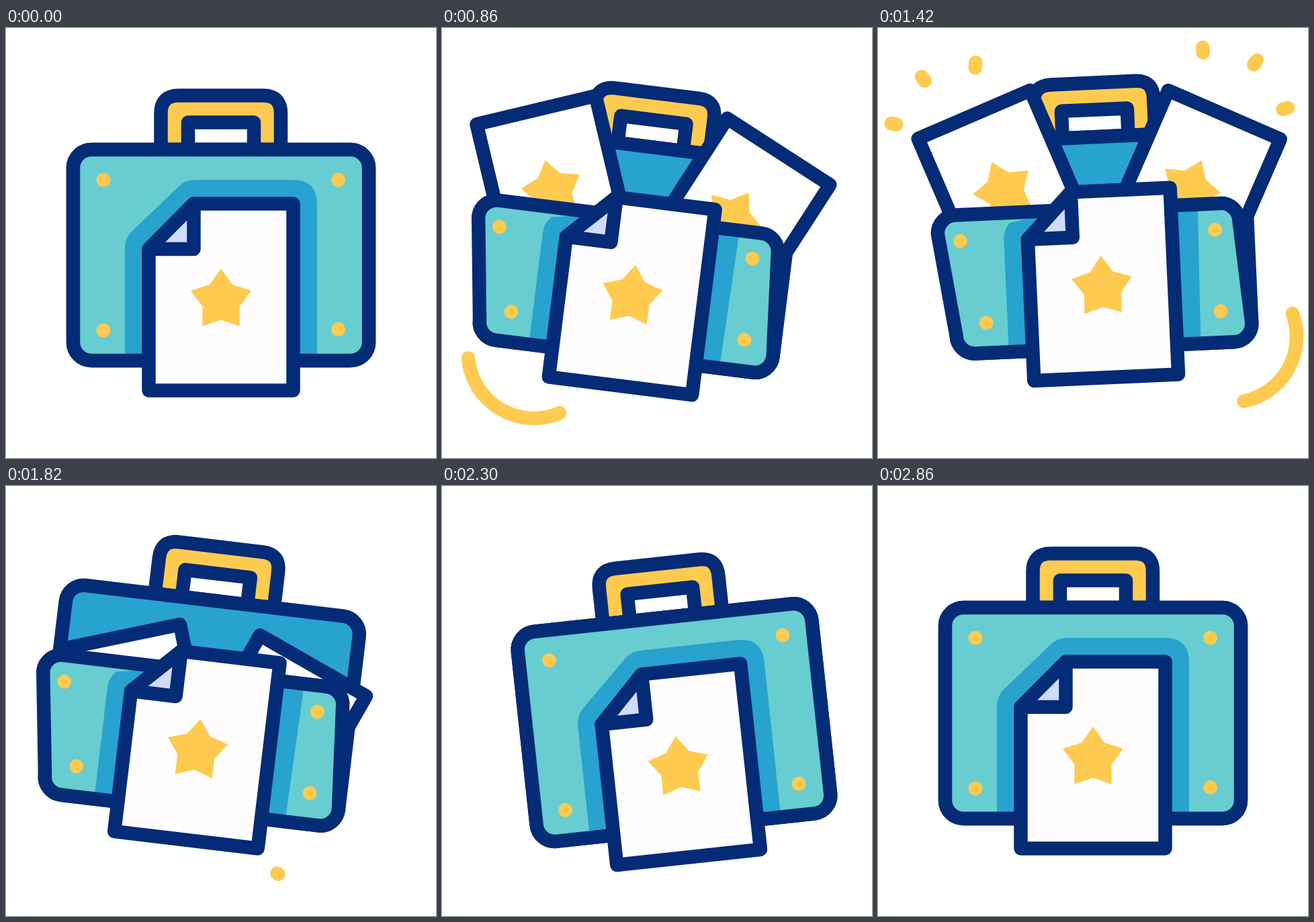
Animation of 640 by 640 pixels, one loop 3.56 s. Source, as an HTML page with a canvas:

```html
<!DOCTYPE html>
<html lang="en">
<head>
<meta charset="utf-8">
<title>Briefcase</title>
<style>
  html, body { margin: 0; width: 100%; height: 100%; overflow: hidden; background: #fff; }
  canvas { display: block; width: 100vmin; height: 100vmin; }
</style>
</head>
<body>
<canvas id="stage" width="640" height="640"></canvas>
<script>
const ctx = document.getElementById('stage').getContext('2d');
const LOOP = 3560, RAD = Math.PI / 180;
const NAVY = '#042b76', TEAL = '#67cdd0', BLUE = '#28a2ce', YELLOW = '#fecb50', FOLD = '#d1dbfa';

// Keys are [time, value] pairs, joined by a sine ease.
const ANGLE = [[220, 0], [350, -1], [790, 8], [1225, -5.6], [1820, 6.8], [2320, -6.2], [2860, 0]];
const LIFT = [[220, 0], [340, 20], [585, -30.5], [1110, 19.7], [1500, -23], [2300, 15.5], [2800, 0]];
const OPEN = [[370, 0], [655, 1], [1890, 1], [2190, 0]];
const PAPERS = [[610, 0], [900, 1], [1600, 1], [1990, 0]];

// Sparks: middle of the first dash and its heading in degrees.
const SPARKS = [[56, 157, 194], [88, 113, 236], [142, 102, 277], [488, 95, 266], [541, 110, 307], [569, 159, 348]];

const clamp = x => Math.min(1, Math.max(0, x));
const ramp = (t, from, to) => clamp((t - from) / (to - from));
const easeOut = p => 1 - (1 - p) ** 2;
const sine = p => (1 - Math.cos(Math.PI * p)) / 2;
const mix = (a, b, p) => a + (b - a) * p;

function track(keys, t) {
  let value = keys[0][1];
  for (let i = 1; i < keys.length; i++) {
    const [t0, v0] = keys[i - 1], [t1, v1] = keys[i];
    if (t >= t0) value = mix(v0, v1, sine(ramp(t, t0, t1)));
  }
  return value;
}

function shape(path, fill, line = NAVY) {
  if (typeof path === 'string') path = new Path2D(path);
  if (fill) { ctx.fillStyle = fill; ctx.fill(path); }
  if (line) { ctx.strokeStyle = line; ctx.stroke(path); }
}

// Case outline; opening carries the two upper corners down and to the left.
function panel(open) {
  const left = 100 - 21 * open, right = 540 - 12 * open, top = 181 + 107 * open;
  return new Path2D(`M${left} ${top + 27}a27 27 0 0 1 27 -27H${right - 27}a27 27 0 0 1 27 27` +
    'L540 468a27 27 0 0 1 -27 27H127a27 27 0 0 1 -27 -27Z');
}

function dot(x, y) {
  ctx.fillStyle = YELLOW;
  ctx.beginPath();
  ctx.arc(x, y, 10.5, 0, 7);
  ctx.fill();
}

function star(x, y) {
  ctx.fillStyle = YELLOW;
  ctx.beginPath();
  for (let i = 0; i < 10; i++) {
    const r = i % 2 ? 29 : 47.3, a = (i * 36 - 90) * RAD;
    ctx.lineTo(x + r * Math.cos(a), y + r * Math.sin(a));
  }
  ctx.fill();
}

function paper(x, y, angle) {
  ctx.save();
  ctx.translate(x, y);
  ctx.rotate(angle * RAD);
  shape('M-87 -123H95V95H-87Z', '#fff');
  star(0, 0);
  ctx.restore();
}

function swoosh(t, start, end, x, y, from, to) {
  const p = ramp(t, start, end);
  if (p <= 0 || p >= 1) return;
  const head = easeOut(ramp(p, 0, .485)), tail = ramp(p, .23, 1);
  ctx.strokeStyle = YELLOW;
  ctx.beginPath();
  ctx.arc(x, y, 98, mix(from, to, tail) * RAD, mix(from, to, head) * RAD, from > to);
  ctx.stroke();
}

function spark([x, y, heading], t) {
  const head = 58 * easeOut(ramp(t, 1006, 1542)) - 15;
  const tail = 58 * easeOut(ramp(t, 1076, 1685)) - 15;
  if (head <= -15 || tail >= 43) return;
  const c = Math.cos(heading * RAD), s = Math.sin(heading * RAD);
  ctx.strokeStyle = YELLOW;
  ctx.beginPath();
  ctx.moveTo(x + tail * c, y + tail * s);
  ctx.lineTo(x + head * c, y + head * s);
  ctx.stroke();
}

function flap(open) {
  const outline = panel(open), edge = 463 + 5 * open;
  shape(outline, TEAL, null);
  ctx.save();
  ctx.clip(outline);
  shape(`M177 495V328Q177 313 187 303L257 ${236 + 54 * open}Q267 226 281 226H427Q${edge} 226 ${edge} 262L463 495Z`, BLUE, null);
  ctx.restore();
  shape(outline);
  dot(145 - 33 * open, 226 + 101 * open);
  dot(494.5 - 3 * open, 226 + 101 * open);
  dot(145, 450);
  dot(494.5, 448.5);
}

function draw(t) {
  const open = track(OPEN, t), hidden = 1 - track(PAPERS, t);
  ctx.clearRect(0, 0, 640, 640);
  ctx.save();
  ctx.translate(320, 100 + track(LIFT, t));
  ctx.rotate(track(ANGLE, t) * RAD);
  ctx.translate(-320, -100);
  ctx.lineWidth = 20.5;
  ctx.lineCap = ctx.lineJoin = 'round';

  shape('M230.5 181V127Q230.5 100.5 257 100.5H383Q409 100.5 409 127V181Z', YELLOW);
  shape('M271 181V140.5H369V181Z', '#fff');
  shape(panel(0), BLUE);

  ctx.save();
  ctx.beginPath();
  ctx.rect(-200, -200, 1040, 680);
  ctx.clip();
  paper(181 + 68 * hidden, 256 + 187 * hidden, -20.7 + 3.6 * hidden);
  paper(455.5 - 50 * hidden, 265.5 + 175 * hidden, 26 - 5 * hidden);
  ctx.restore();

  flap(open);
  shape('M212.5 329L279.5 261.5H427.5V539.5H212.5Z', '#fffdfe');
  shape('M212.5 329L279.5 261.5V329Z', FOLD);
  star(320, 405.5);

  SPARKS.forEach(s => spark(s, t));
  swoosh(t, 690, 1132, 186, 506, 197, 54);
  swoosh(t, 1300, 1825, 508, 487, -18, 119);
  ctx.restore();
}

function tick() {
  draw(performance.now() % LOOP);
  requestAnimationFrame(tick);
}
tick();
</script>
</body>
</html>
```
